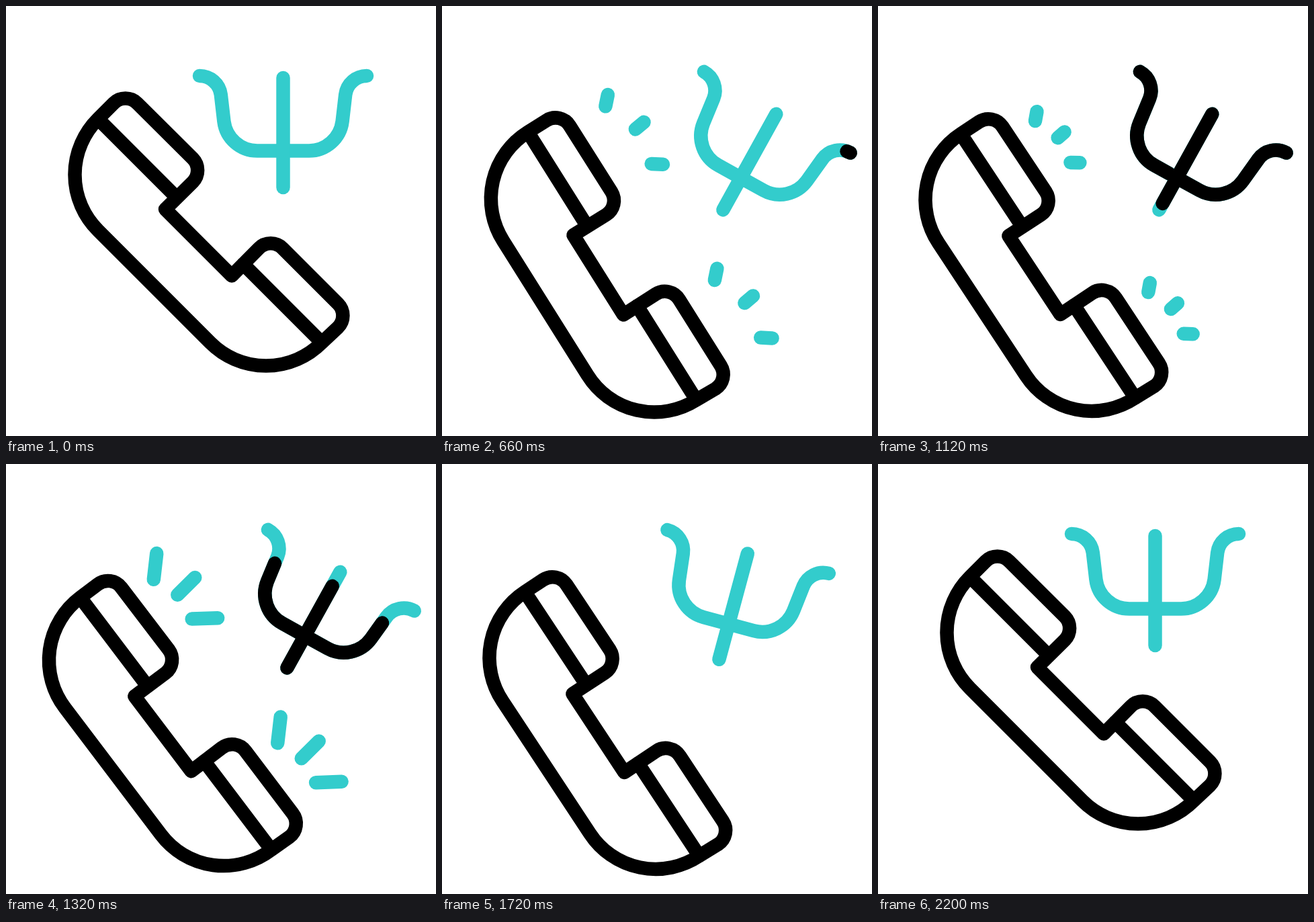
An HTML page with a canvas for the animation above (2400 ms loop, 640 by 640 pixels).

```html
<!DOCTYPE html>
<html lang="en">
<head>
<meta charset="utf-8">
<title>Phone counselling</title>
<style>
  html, body { margin: 0; width: 100%; height: 100%; overflow: hidden; background: #fff; }
  canvas { display: block; width: 640px; height: 640px; }
</style>
</head>
<body>
<canvas id="stage" width="640" height="640"></canvas>
<script>
const ctx = document.getElementById('stage').getContext('2d');
const LOOP = 2400, TEAL = '#33cccc', BLACK = '#000';

const phone = new Path2D(
  'M237 302.5L278 262A25 25 0 0 0 278 227L195.5 145A25 25 0 0 0 160 145' +
  'L137 168A117 117 0 0 0 137 334L304 501A117 117 0 0 0 470 501' +
  'L494 478.5A25 25 0 0 0 494 443L412 361A25 25 0 0 0 376 361L336 401.5Z' +
  'M137 168L253 284M353 384L470 501');

// Each ray grows from its inner end to its outer end.
const rays = [
  ['M241.5 127L240.6 87.4', 39.6],
  ['M279.5 144.8L302 115.2', 37.2],
  ['M305.3 177L343.8 170.2', 39.1]
].map(([d, length]) => ({ path: new Path2D(d), length }));

// Right half of the psi's bowl, from its tip to the middle.
const bowl = {
  path: new Path2D('M537 104A32 32 0 0 0 505.2 132L500.6 171.7A50 50 0 0 1 451 215.5H412.5'),
  length: 197
};
const bar = { path: new Path2D('M412.5 107V270'), length: 163 };

// Eased value at time t from [time, value] keys.
function track(t, ...keys) {
  if (t <= keys[0][0]) return keys[0][1];
  for (let i = 1; i < keys.length; i++) {
    const [t0, v0] = keys[i - 1], [t1, v1] = keys[i];
    if (t < t1) {
      const u = (t - t0) / (t1 - t0);
      return v0 + (v1 - v0) * u * u * (3 - 2 * u);
    }
  }
  return keys[keys.length - 1][1];
}

const ramp = (t, from, to) => track(t, [from, 0], [to, 1]);

// Strokes the part of a line between the fractions a and b.
function trim({ path, length }, a, b, color) {
  if (b - a < 0.001) return;
  ctx.strokeStyle = color;
  ctx.setLineDash([(b - a) * length + 0.01, 9999]);
  ctx.lineDashOffset = -a * length;
  ctx.stroke(path);
  ctx.setLineDash([]);
}

function turned(px, py, dx, dy, degrees, draw) {
  ctx.save();
  ctx.translate(px + dx, py + dy);
  ctx.rotate(degrees * Math.PI / 180);
  ctx.translate(-px, -py);
  draw();
  ctx.restore();
}

function mirrored(draw) {
  ctx.save();
  ctx.translate(825, 0);
  ctx.scale(-1, 1);
  draw();
  ctx.restore();
}

function drawRays(t) {
  const start = t < 900 ? 200 : 1000;
  const head = ramp(t, start, start + 300);
  const tail = ramp(t, start + 300, start + 600);
  for (const shift of [0, 216]) {
    ctx.save();
    ctx.translate(shift, shift);
    rays.forEach(ray => trim(ray, tail, head, TEAL));
    ctx.restore();
  }
}

function drawPhone(t) {
  const away = track(t, [200, 0], [600, 1], [1800, 1], [2200, 0]);
  const angle = track(t, [200, 0], [600, 15], [900, -5], [1200, 15],
    [1500, -5], [1800, 15], [2200, 0]);
  turned(298, 340.5, -51.5 * away, 51.1 * away, angle, () => {
    ctx.strokeStyle = BLACK;
    ctx.stroke(phone);
    drawRays(t);
  });
}

function drawPsi(t) {
  const dx = track(t, [200, 0], [600, -1.3], [1600, -1.3], [1900, -9], [2200, 0]);
  const dy = track(t, [200, 0], [600, 30], [1600, 30], [1900, 0.5], [2200, 0]);
  const angle = track(t, [200, 0], [600, 29], [1600, 29], [1900, -10], [2200, 0]);
  const right = ramp(t, 600, 1200), rest = ramp(t, 700, 1200);
  const bowlTail = ramp(t, 1200, 1540), barTail = ramp(t, 1200, 1700);
  turned(409.5, 285.5, dx, dy, angle, () => {
    ctx.strokeStyle = TEAL;
    ctx.stroke(bowl.path);
    mirrored(() => ctx.stroke(bowl.path));
    ctx.stroke(bar.path);
    trim(bowl, bowlTail, right, BLACK);
    mirrored(() => trim(bowl, bowlTail, rest, BLACK));
    trim(bar, barTail, rest, BLACK);
  });
}

const begin = performance.now();

function frame() {
  const t = (performance.now() - begin) % LOOP;
  ctx.fillStyle = '#fff';
  ctx.fillRect(0, 0, 640, 640);
  ctx.lineWidth = 20.5;
  ctx.lineCap = ctx.lineJoin = 'round';
  drawPhone(t);
  drawPsi(t);
  requestAnimationFrame(frame);
}
frame();
</script>
</body>
</html>
```
